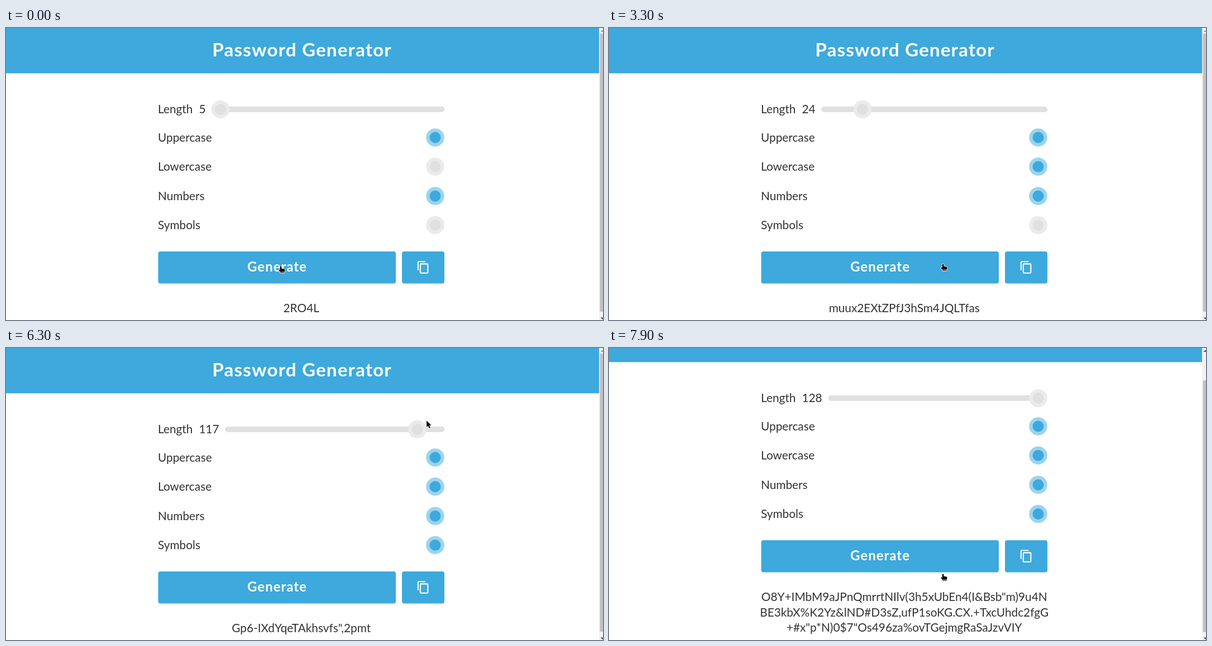
Recreate the animation shown at these times as an HTML page with a canvas. Size 1069 px wide and 524 px high, loop 8 s.

```html
<!DOCTYPE html>
<html lang="en">
<head>
<meta charset="utf-8">
<title>Password Generator</title>
<style>
  html, body { margin: 0; width: 100%; height: 100%; overflow: hidden; background: #fff; }
  canvas { display: block; }
</style>
</head>
<body>
<canvas id="stage" width="1069" height="524"></canvas>
<script>
const ctx = document.getElementById('stage').getContext('2d');
const W = 1069, H = 524, LOOP = 8000, STEP = 100;
const BLUE = '#3da9dc', PALE = '#9cd4ed', GREY = '#e0e0e0', RING = '#ebebeb', INK = '#333';
const LEFT = 272.5, RIGHT = 785, MID = 528.7, LINE = 27.6;
const ARROW = new Path2D('M.5.8V12.6L3.2 10 5.1 14.4 7.2 13.5 5.3 9.2H9Z');
const HAND = new Path2D('M-1.3 1.2Q0-.6 1.3 1.2V4.6L6.5 5.6Q7.6 6 7.5 7.4L6.6 10.4V12.6H-.8V11L-3.6 7.8Q-3.7 6.2-2.3 6.6L-1.3 7.4Z');

// Moves: start, end, then the values reached; held in between
const HOME = [492, 427];
const MOVES = [
  [0, 700, 386, 146], [900, 1400, 452, 147], [1500, 1800, 732, 219], [2000, 2300, 773, 240],
  [2500, 2600, 614, 405], [2700, 2800, 598, 423], [3300, 3700, 787, 340], [3700, 3900, 770, 350],
  [4100, 4400, 462, 164], [4400, 4700, 490, 453], [4700, 4900, 500, 431], [5300, 5600, 477, 158],
  [5600, 5800, 456, 143], [5900, 6400, 787, 128], [6400, 6800, 602, 392], [6800, 7000, 596, 403.5],
  [7400, 7500, 598, 405]
];
const DRAGS = [[900, 1400, 23], [1500, 1600, 24], [5900, 6400, 128]];
const PASSWORDS = [
  [0, ['2RO4L']],
  [3300, ['muux2EXtZPfJ3hSm4JQLTfas']],
  [5300, ['Gp6-IXdYqeTAkhsvfs",2pmt']],
  [7600, ['O8Y+IMbM9aJPnQmrrtNIlv(3h5xUbEn4(I&Bsb"m)9u4N',
    'BE3kbX%K2Yz&lND#D3sZ,ufP1soKG.CX.+TxcUhdc2fgG',
    '+#x"p*N)0$7"Os496za%ovTGejmgRaSaJzvVIY']]
];
const OPTIONS = [['Uppercase', 196.5, 0], ['Lowercase', 248.7, 2500], ['Numbers', 301.5, 0], ['Symbols', 353.7, 4100]];

const progress = (t, a, b) => Math.min(1, Math.max(0, (t - a) / (b - a)));
const smooth = s => s * s * (3 - 2 * s);

function follow(moves, from, t) {
  let pos = from;
  for (const [a, b, ...to] of moves) {
    const s = smooth(progress(t, a, b));
    pos = pos.map((p, i) => p + (to[i] - p) * s);
  }
  return pos;
}

function text(str, x, y, { size = 20.8, weight = 400, color = INK, align = 'left', gap = 0 } = {}) {
  ctx.font = `${weight} ${size}px Lato, sans-serif`;
  ctx.letterSpacing = gap + 'px';
  ctx.textAlign = align;
  ctx.fillStyle = color;
  ctx.fillText(str, x, y);
}

function box(x, y, w, h, r, color) {
  ctx.fillStyle = color;
  ctx.beginPath();
  ctx.roundRect(x, y, w, h, r);
  ctx.fill();
}

function disc(x, y, r, color) {
  ctx.fillStyle = color;
  ctx.beginPath();
  ctx.arc(x, y, r, 0, Math.PI * 2);
  ctx.fill();
}

function knob(x, y, on) {
  disc(x, y, 16.3, on ? PALE : RING);
  disc(x, y, 10, on ? BLUE : GREY);
}

function slider(value) {
  const left = 355.5 + 12.3 * String(value).length;
  text('Length', 272, 153);
  text(value, 345.5, 153);
  box(left, 141, RIGHT - left, 10, 5, GREY);
  knob(left + 16.3 + (value - 5) / 123 * (RIGHT - left - 32.6), 146, false);
}

function copyIcon() {
  ctx.strokeStyle = '#fff';
  ctx.lineWidth = 2.1;
  ctx.beginPath();
  ctx.roundRect(741.9, 423.4, 13.4, 16.4, 1);
  ctx.moveTo(737.8, 434.7);
  ctx.lineTo(737.8, 420.3);
  ctx.quadraticCurveTo(737.8, 419.3, 738.8, 419.3);
  ctx.lineTo(751.2, 419.3);
  ctx.stroke();
}

function buttons() {
  box(LEFT, 401, 425.5, 57.5, 4, BLUE);
  text('Generate', 485.5, 437, { size: 24, weight: 700, color: '#fff', align: 'center', gap: 1 });
  box(709, 401, 76, 57.5, 4, BLUE);
  copyIcon();
}

function triangle(y, dir, color) {
  ctx.fillStyle = color;
  ctx.beginPath();
  ctx.moveTo(1064.5, y);
  ctx.lineTo(1071.5, y);
  ctx.lineTo(1068, y - 3.5 * dir);
  ctx.fill();
}

function scrollbar(scroll, lines) {
  const page = 525 + LINE * (lines - 1);
  ctx.fillStyle = '#f1f1f1';
  ctx.fillRect(1062, 0, 7, H);
  ctx.fillStyle = '#c1c1c1';
  ctx.fillRect(1063.5, 10 + 500 * scroll / page, 5.5, 500 * H / page);
  triangle(7, 1, scroll ? '#505050' : '#a3a3a3');
  triangle(519.5, -1, '#505050');
}

function pointer(x, y, t) {
  const onButton = (y > 401 && y < 458.5 && x > LEFT && x < 698) || t >= 6900;
  const shape = onButton ? HAND : ARROW;
  ctx.save();
  ctx.translate(x, y);
  ctx.lineJoin = 'round';
  ctx.lineWidth = 1.6;
  ctx.strokeStyle = '#fff';
  ctx.stroke(shape);
  ctx.fillStyle = '#000';
  ctx.fill(shape);
  if (onButton) {
    ctx.lineWidth = 0.8;
    ctx.beginPath();
    ctx.moveTo(-0.6, 10.9);
    ctx.lineTo(6.4, 10.9);
    ctx.stroke();
  }
  ctx.restore();
}

function draw(t) {
  const scroll = 56 * progress(t, 7600, 7900) ** 2.38;
  const lines = PASSWORDS.filter(p => p[0] <= t).pop()[1];
  ctx.fillStyle = '#fff';
  ctx.fillRect(0, 0, W, H);
  ctx.save();
  ctx.translate(0, -scroll);
  ctx.fillStyle = BLUE;
  ctx.fillRect(0, 0, 1062, 81.3);
  text('Password Generator', 530, 51, { size: 33.3, weight: 700, color: '#fff', align: 'center', gap: 1.1 });
  slider(Math.round(follow(DRAGS, [5], t)[0]));
  for (const [name, y, since] of OPTIONS) {
    text(name, 272, y + 7);
    knob(768.5, y, t >= since);
  }
  buttons();
  lines.forEach((line, i) => text(line, MID, 510 + i * LINE, { align: 'center' }));
  ctx.restore();
  scrollbar(scroll, lines.length);
  pointer(...follow(MOVES, HOME, t), t);
}

const start = performance.now();
function tick() {
  const t = (performance.now() - start) % LOOP;
  draw(Math.floor(t / STEP) * STEP);
  requestAnimationFrame(tick);
}
tick();
</script>
</body>
</html>
```
